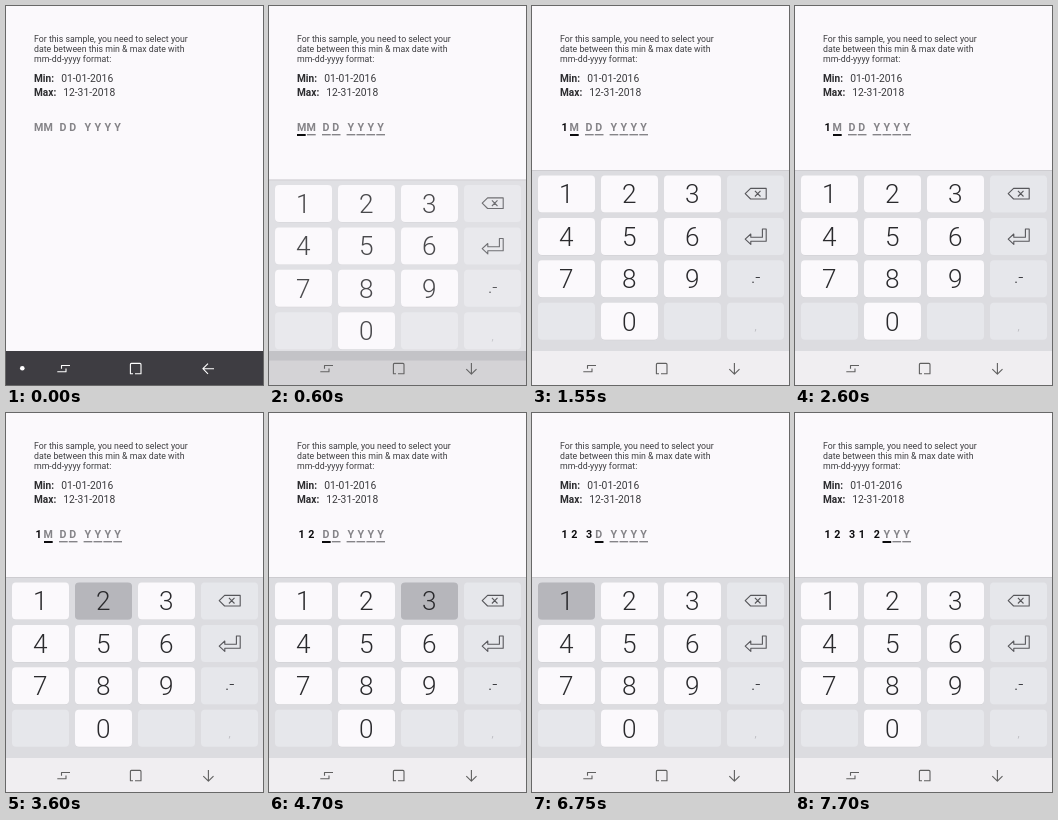
An HTML page that plays this animation: 257x379 px, repeating every 8 s.

```html
<!DOCTYPE html>
<html lang="en">
<head>
<meta charset="utf-8">
<title>Date entry with min and max</title>
<style>
html, body { margin: 0; width: 100%; height: 100%; overflow: hidden; background: #fbf9fc; }
svg { display: block; width: 100vw; height: 100vh; }
text { font-family: Roboto, "Noto Sans", sans-serif; white-space: pre; }
.note { font-size: 8.77px; fill: #3e3e41; }
.range { font-size: 10.3px; fill: #3a3a3d; }
.range .label { font-size: 10.1px; font-weight: 700; fill: #2c2c2f; }
.cell { font-size: 10.7px; font-weight: 700; text-anchor: middle; }
.digit { font-size: 26.2px; font-weight: 300; text-anchor: middle; fill: #2a2a2d; }
.line { fill: none; stroke-width: 1.1; stroke-linejoin: round; }
</style>
</head>
<body>
<svg viewBox="0 0 257 379" preserveAspectRatio="none">
  <rect width="257" height="379" fill="#fbf9fc"/>
  <text class="note" x="28" y="35.6">For this sample, you need to select your</text>
  <text class="note" x="28" y="45.7">date between this min &amp; max date with</text>
  <text class="note" x="28" y="55.8">mm-dd-yyyy format:</text>
  <text class="range" x="28" y="76.3"><tspan class="label">Min:</tspan><tspan x="55.2">01-01-2016</tspan></text>
  <text class="range" x="28" y="90"><tspan class="label">Max:</tspan><tspan x="57.2">12-31-2018</tspan></text>
  <g id="field"></g>

  <rect y="345" width="257" height="34" fill="#3e3d42"/>
  <g id="board">
    <rect y="164" width="257" height="190" fill="#dcdce0"/>
    <rect y="164" width="257" height="1" fill="#cdccd0"/>
    <rect y="345" width="257" height="80" fill="#f0eef1"/>
    <g id="keys"></g>
    <g class="line" stroke="#57575b">
      <path d="M213.2 187.7 L218.6 182.4 H234.2 V193 H218.6 Z M222.9 184.9 l5.6 5.6 M228.5 184.9 l-5.6 5.6"/>
      <path d="M213.2 233.2 L218.8 228 V231.2 H230.4 V223 H234.2 V235.2 H218.8 V238.4 Z"/>
    </g>
    <text x="223.8" y="277" font-size="18" font-weight="300" text-anchor="middle" fill="#2f2f33">.-</text>
    <text x="223.5" y="324" font-size="11" text-anchor="middle" fill="#bdbdc2">,</text>
  </g>

  <circle id="dot" cx="16.3" cy="362.3" r="2.3" fill="#fff"/>
  <g id="nav" class="line">
    <path d="M64 359.5 H55.5 V362.8 M51.3 365.8 H60 V362.6"/>
    <path d="M127 367.8 H124.4 V358.4 Q124.4 357.4 125.4 357.4 H134 Q135 357.4 135 358.4 V367.8 H129"/>
    <path id="arrow" d="M208 362.7 H197 M202 357.6 L196.9 362.7 L202 367.8"/>
  </g>
</svg>
<script>
const LOOP = 8000, STEP = 50;
const KEY = '#fbf9fc', PRESSED = '#b6b6bb', INK = '#0c0c0e', HINT = '#858488';
const $ = id => document.getElementById(id);

function add(parent, tag, attrs, label) {
  const el = document.createElementNS('http://www.w3.org/2000/svg', tag);
  for (const k in attrs) el.setAttribute(k, attrs[k]);
  if (label) el.textContent = label;
  return parent.appendChild(el);
}

// Number pad: four columns, the last one holds function keys
const keys = {};
'123<456e789._0_,'.split('').forEach((name, i) => {
  const x = 6 + i % 4 * 63, y = 169.5 + Math.floor(i / 4) * 42.4;
  const isDigit = name >= '0' && name <= '9';
  const box = { x, y, width: 57, height: 37, rx: 4 };
  if (isDigit) add($('keys'), 'rect', { ...box, y: y + 0.5, fill: '#cfcfd3' });
  const face = add($('keys'), 'rect', { ...box, fill: isDigit ? KEY : '#e6e7eb' });
  if (isDigit) {
    keys[name] = face;
    add($('keys'), 'text', { class: 'digit', x: x + 28.3, y: y + 27.9 }, name);
  }
});

// Masked cells: letter, centre, underline start
const cells = [
  ['M', 32.6, 28], ['M', 42.3, 38], ['D', 57, 53], ['D', 66.8, 62.8],
  ['Y', 81.8, 77.6], ['Y', 91.8, 87.5], ['Y', 101.7, 97.4], ['Y', 111.6, 107.3]
].map(([letter, cx, x]) => ({
  letter,
  glyph: add($('field'), 'text', { class: 'cell', x: cx, y: 125.3 }),
  rule: add($('field'), 'rect', { x, y: 128, width: 8.7 })
}));

// Key presses: digit, press, release, time typed (none when rejected)
const taps = [
  ['1', 1450, 1550, 1500], ['3', 2350, 2450], ['2', 3600, 3700, 3700],
  ['3', 4700, 4800, 4800], ['2', 5700, 5800], ['1', 6750, 6800, 6800],
  ['2', 7600, 7700, 7700]
];
const SHAKE = [2, -2, 1];

function draw(now) {
  const t = Math.floor(now % LOOP / STEP) * STEP;
  const open = t >= 350;
  const p = open ? Math.min(1, (t - 300) / 400) : 0;

  $('board').setAttribute('opacity', 1 - (1 - p) ** 1.35);
  $('board').setAttribute('transform', `translate(0 ${38 * (1 - p)})`);
  const tint = Math.round(255 - 160 * Math.min(1, 1.3 * p));
  $('nav').setAttribute('stroke', `rgb(${tint},${tint},${tint})`);
  $('dot').setAttribute('opacity', Math.max(0, 1 - 2 * p));
  const turn = Math.min(1, 2 * p);
  $('arrow').setAttribute('transform', `rotate(${-90 * turn} 202.4 362.7)`);

  let typed = '', held = '', shift = 0;
  for (const [digit, down, up, at] of taps) {
    if (t >= down && t < up) held = digit;
    if (at) typed += t >= at ? digit : '';
    else shift += SHAKE[(t - up) / STEP] || 0;
  }
  for (const k in keys) keys[k].setAttribute('fill', k === held ? PRESSED : KEY);

  $('field').setAttribute('transform', `translate(${shift} 0)`);
  cells.forEach(({ letter, glyph, rule }, i) => {
    const done = i < typed.length, active = i === typed.length;
    glyph.textContent = done ? typed[i] : letter;
    glyph.setAttribute('fill', done ? INK : HINT);
    rule.setAttribute('opacity', open && !done ? 1 : 0);
    rule.setAttribute('height', active ? 2 : 1.4);
    rule.setAttribute('fill', active ? INK : HINT);
  });
}

const start = performance.now();
function frame() {
  draw(performance.now() - start);
  requestAnimationFrame(frame);
}
frame();
</script>
</body>
</html>
```
